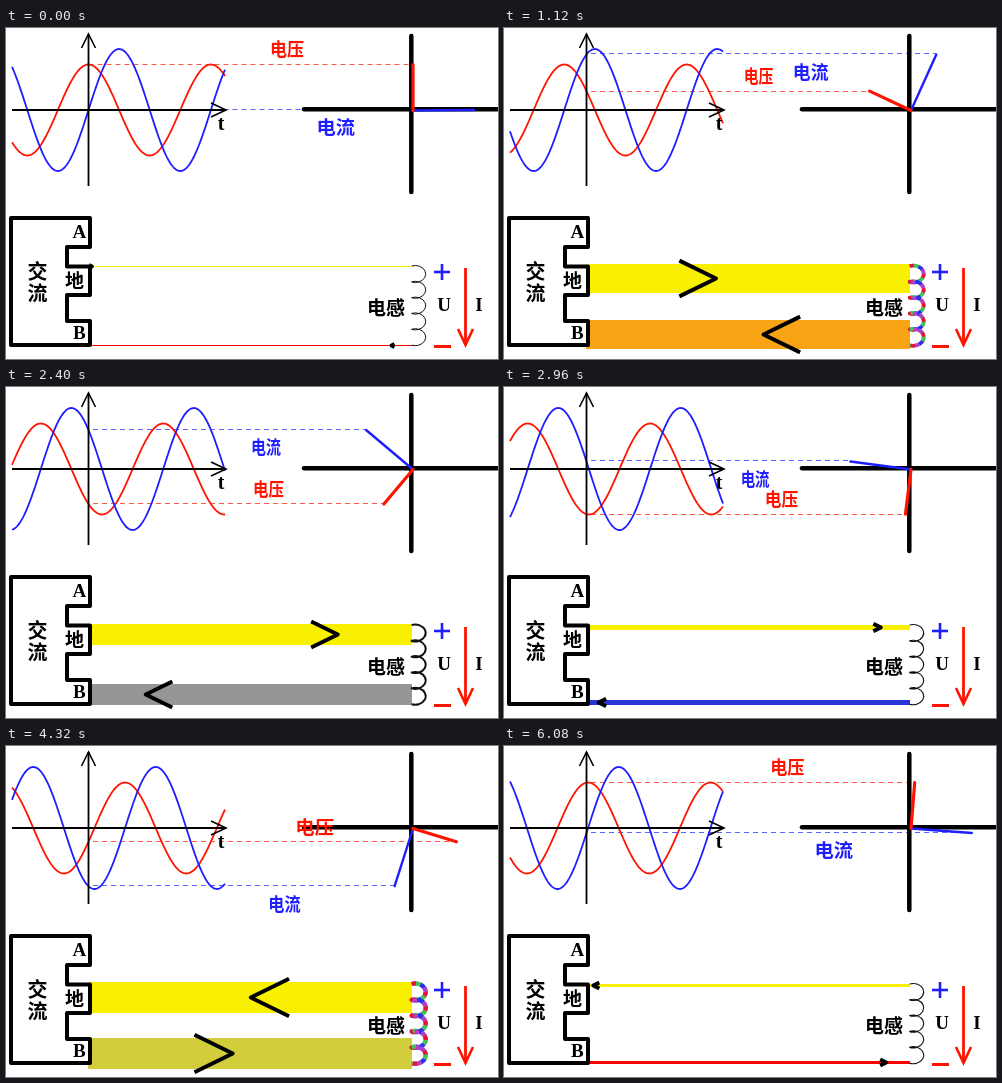
Animation of 492 by 331 pixels, one loop 6160 ms. Source, as an HTML page with a canvas:

```html
<!DOCTYPE html>
<html lang="zh">
<head>
<meta charset="utf-8">
<style>
html, body { margin: 0; width: 100%; height: 100%; overflow: hidden; background: #fff; }
canvas { display: block; }
</style>
</head>
<body>
<canvas id="stage" width="492" height="331"></canvas>
<script>
const ctx = document.getElementById('stage').getContext('2d');
const STEP = 80, STEPS = 77, TAU = Math.PI * 2;
const RED = '#ff1400', BLUE = '#1e1eff', BLACK = '#000', YELLOW = '#f8f000';
const CJK = '"Noto Sans CJK SC", "Noto Sans CJK", sans-serif';
const LATIN = '"Liberation Serif", serif';
const ORIGIN = { x: 407, y: 82 }, WAVE_X = 82.5, PERIOD = 122.4;
const VOLT = 45.5, AMP = 61;

// wire colour by potential, from -1 to 1
const POTENTIAL = [
  [-1, 40, 50, 215], [-0.86, 56, 118, 194], [-0.77, 150, 150, 150],
  [0, 248, 240, 0], [0.41, 248, 165, 20], [0.84, 255, 100, 16], [1, 255, 0, 0]
];

function potentialColor(v) {
  let i = 1;
  while (i < POTENTIAL.length - 1 && v > POTENTIAL[i][0]) i++;
  const a = POTENTIAL[i - 1], b = POTENTIAL[i];
  const k = Math.min(1, Math.max(0, (v - a[0]) / (b[0] - a[0])));
  const mix = j => Math.round(a[j] + (b[j] - a[j]) * k);
  return `rgb(${mix(1)},${mix(2)},${mix(3)})`;
}

function line(points, color, width, closed) {
  ctx.beginPath();
  points.forEach(([x, y]) => ctx.lineTo(x, y));
  if (closed) ctx.closePath();
  ctx.strokeStyle = color;
  ctx.lineWidth = width;
  ctx.stroke();
}

function text(str, x, y, size, color, family, squash = 1) {
  ctx.save();
  ctx.translate(x, y + size * (family === CJK ? 0.37 : 0.33));
  ctx.scale(squash, 1);
  ctx.font = `bold ${size}px ${family}`;
  ctx.textAlign = 'center';
  ctx.fillStyle = color;
  ctx.fillText(str, 0, 0);
  ctx.restore();
}

function wave(fn, color) {
  const pts = [];
  for (let x = 6; x <= 219; x++) pts.push([x, ORIGIN.y - fn(TAU * (x - WAVE_X) / PERIOD)]);
  line(pts, color, 1.8);
}

function projection(x, y, color) {
  ctx.setLineDash([5, 4]);
  line([[WAVE_X, Math.floor(y) + 0.5], [x, Math.floor(y) + 0.5]], color, 1);
  ctx.setLineDash([]);
}

function graphs(a) {
  const sin = Math.sin(a), cos = Math.cos(a);
  const volt = [ORIGIN.x - VOLT * sin, ORIGIN.y - VOLT * cos];
  const amp = [ORIGIN.x + AMP * cos, ORIGIN.y - AMP * sin];

  projection(volt[0], volt[1], '#ff5a46');
  projection(amp[0], amp[1] - 0.6, '#5a64ff');
  wave(p => VOLT * Math.cos(p + a), RED);
  wave(p => AMP * Math.sin(p + a), BLUE);

  line([[82.5, 158], [82.5, 6]], BLACK, 1.8);
  line([[75.5, 20], [82.5, 6], [89.5, 20]], BLACK, 1.6);
  line([[6, 82], [220, 82]], BLACK, 1.8);
  line([[205, 75], [220, 82], [205, 89]], BLACK, 1.6);
  text('t', 215, 95.8, 20, BLACK, LATIN);

  ctx.lineCap = 'round';
  line([[405.3, 8], [405.3, 164]], BLACK, 4.5);
  line([[298, 81.3], [494, 81.3]], BLACK, 4.5);
  const start = [ORIGIN.x, ORIGIN.y + 0.5];
  line([start, amp], BLUE, 2.4);
  line([start, volt], RED, 3.2);
  ctx.lineCap = 'butt';

  text('电压', 281 - 29 * sin, volt[1] - 15, 18.5, RED, CJK, 0.92 - 0.13 * sin);
  text('电流', 290.3 + 39.5 * cos, amp[1] + 17.5, 18.5, BLUE, CJK, 0.91 + 0.13 * cos);
}

function coil(s) {
  ctx.beginPath();
  for (let i = 0; i < 5; i++) {
    ctx.ellipse(409.2, 246 + 15.8 * i, 10.5, 8.5, 0, -0.61 * Math.PI, 0.61 * Math.PI);
  }
  ctx.lineWidth = 1 + 1.4 * s + 2.8 * s ** 8;
  if (s < 0.75) {
    ctx.strokeStyle = '#111';
    ctx.stroke();
    return;
  }
  // strong current: coloured bands along the winding
  ctx.strokeStyle = '#8c8ca0';
  ctx.stroke();
  ['#e61432', '#3cc850', '#2832f0', '#b43cc8'].forEach((color, i) => {
    ctx.setLineDash([4.5, 13.5]);
    ctx.lineDashOffset = -4.5 * i;
    ctx.strokeStyle = color;
    ctx.stroke();
  });
  ctx.setLineDash([]);
}

function flowArrow(x, y, s, dir) {
  const half = 1.5 + 18 * s, w = (3 + 37 * s) / 2 * dir;
  line([[x - w, y - half], [x + w, y], [x - w, y + half]], BLACK, 3.9);
}

function circuit(a, n) {
  const sin = Math.sin(a), s = Math.abs(sin), dir = sin < -1e-9 ? -1 : 1;
  const thick = Math.round(0.8 + 31.2 * s);
  const top = Math.round(238 - 2 * s), bottom = Math.round(318 + 6.6 * s ** 8);

  ctx.fillStyle = YELLOW;
  ctx.fillRect(82, top, 324, thick);
  ctx.fillStyle = potentialColor(Math.cos(a));
  ctx.fillRect(82, bottom - thick, 324, thick);

  ctx.lineJoin = 'round';
  line([[5, 190], [84, 190], [84, 219], [61, 219], [61, 238.5], [84, 238.5], [84, 267],
    [61, 267], [61, 293], [84, 293], [84, 317], [5, 317]], BLACK, 4, true);
  text('A', 73.3, 204, 19, BLACK, LATIN);
  text('B', 73.3, 304.5, 19, BLACK, LATIN);
  text('交', 31.5, 244, 20, BLACK, CJK);
  text('流', 31.5, 266, 20, BLACK, CJK);
  text('地', 68.5, 252.5, 19, BLACK, CJK);
  text('电感', 380, 280, 19, BLACK, CJK);

  coil(s);

  // arrows run there and back once per cycle
  const run = 7.8 * Math.min(n, STEPS - n);
  flowArrow(84.5 + run, top + thick / 2, s, dir);
  flowArrow(387 - run, bottom - thick / 2, s, -dir);
  ctx.lineJoin = 'miter';

  line([[428, 244], [444, 244]], BLUE, 2.6);
  line([[436, 236], [436, 252]], BLUE, 2.6);
  line([[428, 318.5], [445, 318.5]], RED, 3);
  line([[459.5, 240], [459.5, 317]], RED, 2.8);
  line([[452, 301], [459.5, 317], [467, 301]], RED, 2.6);
  text('U', 438, 276.5, 19, BLACK, LATIN);
  text('I', 473, 276.5, 19, BLACK, LATIN);
}

function draw(now) {
  const n = Math.floor(now / STEP) % STEPS, a = TAU * n / STEPS;
  ctx.fillStyle = '#fff';
  ctx.fillRect(0, 0, 492, 331);
  graphs(a);
  circuit(a, n);
}

let begin = null;
function tick(now) {
  if (begin === null) begin = now;
  draw(now - begin);
  requestAnimationFrame(tick);
}
draw(0);
requestAnimationFrame(tick);
</script>
</body>
</html>
```
